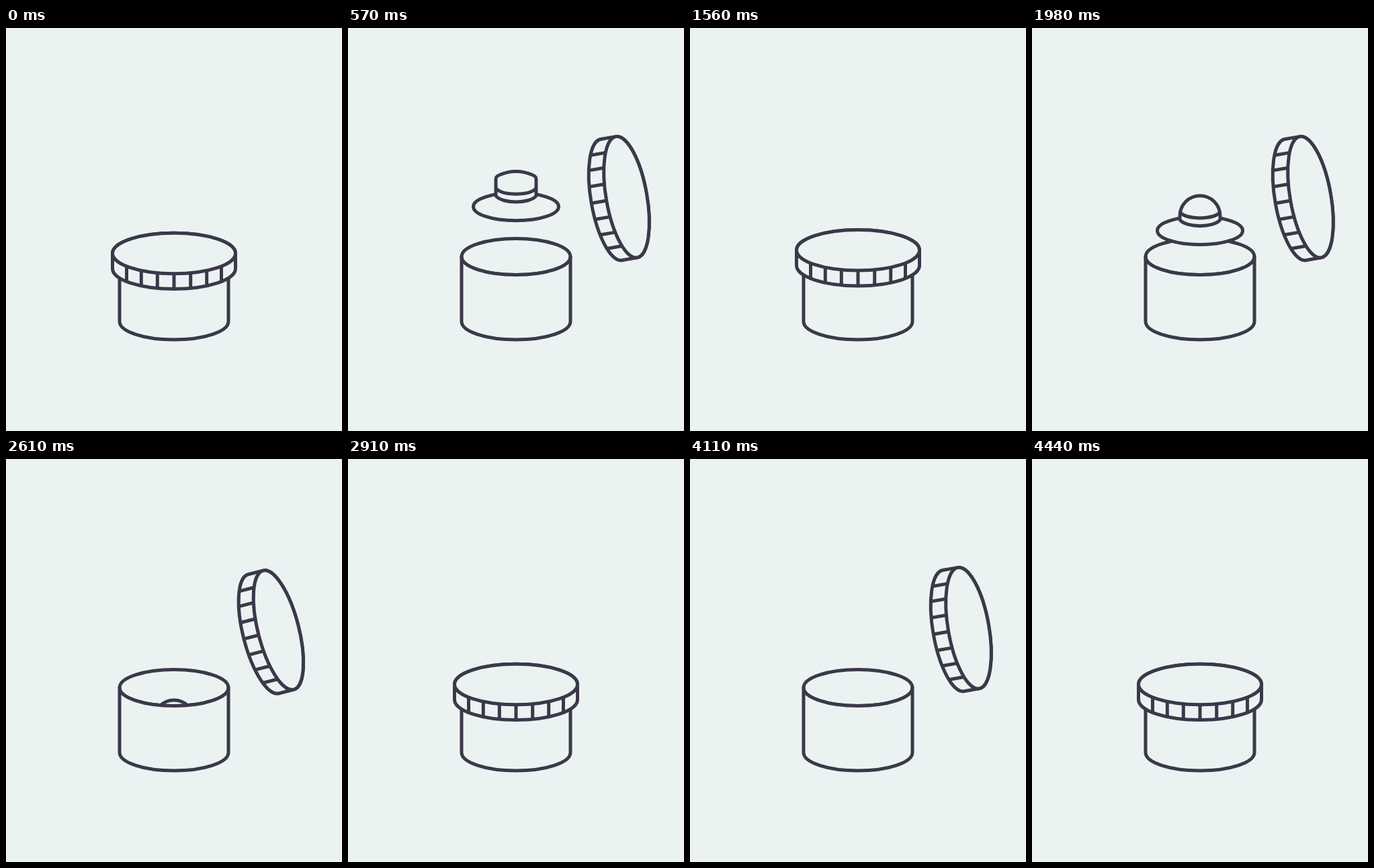
These frames come from a looping animation (500x600 px, 4590 ms). An HTML page with a canvas:

```html
<!DOCTYPE html>
<html lang="en">
<head>
<meta charset="utf-8">
<title>Hat box</title>
<style>
  html, body { margin: 0; width: 100%; height: 100%; overflow: hidden; background: #ebf3f2; }
  canvas { display: block; }
</style>
</head>
<body>
<canvas id="stage" width="500" height="600"></canvas>
<script>
const ctx = document.getElementById('stage').getContext('2d');
const PAPER = '#ebf3f2', INK = '#3b3949';
const LOOP = 4590, STEP = 30;

// Each act: box opens, a hat rises, the hat sinks, the box closes.
const acts = [
  { open: 0,    risen: 570,  sink: 900,  swing: 1050, crown: topHat },
  { open: 1530, risen: 2070, sink: 2430, swing: 2580, crown: bowler },
  { open: 3060, risen: 3570, sink: 3900, swing: 4110, crown: fedora }
];
const LIFT = 30, HAT_TRAVEL = 165;

function ease(t, start, duration) {
  const p = Math.min(1, Math.max(0, (t - start) / duration));
  return p * p * (3 - 2 * p);
}

function shape(build, filled = true) {
  ctx.beginPath();
  build();
  if (filled) ctx.fill();
  ctx.stroke();
}

const oval = (x, y, rx, ry) => shape(() => ctx.ellipse(x, y, rx, ry, 0, 0, Math.PI * 2));

function topHat() {
  ctx.lineTo(220, 225);
  ctx.quadraticCurveTo(220, 221, 225, 219);
  ctx.quadraticCurveTo(250, 208, 275, 219);
  ctx.quadraticCurveTo(280, 221, 280, 225);
}

function bowler() {
  ctx.lineTo(220, 244);
  ctx.arc(250, 244, 30, Math.PI, 0);
}

function fedora() {
  ctx.lineTo(224, 225);
  ctx.quadraticCurveTo(227, 211, 238, 213);
  ctx.quadraticCurveTo(250, 220, 262, 213);
  ctx.quadraticCurveTo(273, 211, 276, 225);
}

function drawHat(crown, drop) {
  ctx.save();
  ctx.translate(0, drop);
  oval(250, 266, 63.5, 20.8);
  shape(() => {
    ctx.moveTo(220, 250);
    crown();
    ctx.lineTo(280, 250);
    ctx.bezierCurveTo(270, 262, 230, 262, 220, 250);
    ctx.closePath();
  });
  shape(() => {
    ctx.moveTo(220, 239);
    ctx.bezierCurveTo(232, 250, 268, 250, 280, 239);
  }, false);
  ctx.restore();
}

function drawBoxFront() {
  shape(() => {
    ctx.ellipse(250, 340.5, 81, 27, 0, Math.PI, 0, true);
    ctx.lineTo(331, 437);
    ctx.ellipse(250, 437, 81, 27, 0, 0, Math.PI);
    ctx.closePath();
  });
}

function drawLid(lift, swing) {
  const rx = 91.5, ry = 30.3, depth = 22.8;
  ctx.save();
  ctx.translate(250 + 164.5 * swing, 335.5 - LIFT * lift - 53.8 * swing);
  ctx.rotate(swing * 80 * Math.PI / 180);
  shape(() => {
    ctx.ellipse(0, 0, rx, ry, 0, Math.PI, 0);
    ctx.lineTo(rx, depth);
    ctx.ellipse(0, depth, rx, ry, 0, 0, Math.PI);
    ctx.closePath();
  });
  oval(0, 0, rx, ry);
  for (const x of [-70.5, -48.7, -24.7, 0, 24.7, 48.7, 70.5]) {
    const y = ry * Math.sqrt(1 - (x / rx) ** 2);
    shape(() => {
      ctx.moveTo(x, y);
      ctx.lineTo(x, y + depth);
    }, false);
  }
  ctx.restore();
}

function draw(t) {
  const act = acts.filter(a => a.open <= t).pop();
  const lift = ease(t, act.open, 120) - ease(t, act.swing + 210, 120);
  const swing = ease(t, act.open + 120, 180) - ease(t, act.swing, 210);
  const riseStart = act.open + 240;
  const rise = ease(t, riseStart, act.risen - riseStart) - ease(t, act.sink, 230);

  ctx.fillStyle = PAPER;
  ctx.fillRect(0, 0, 500, 600);
  ctx.strokeStyle = INK;
  ctx.lineWidth = 5;
  ctx.lineJoin = 'round';

  oval(250, 340.5, 81, 27);
  if (rise > 0) drawHat(act.crown, HAT_TRAVEL * (1 - rise));
  drawBoxFront();
  drawLid(lift, swing);
}

const start = performance.now();
function tick() {
  const t = (performance.now() - start) % LOOP;
  draw(Math.floor(t / STEP) * STEP);
  requestAnimationFrame(tick);
}
tick();
</script>
</body>
</html>
```
